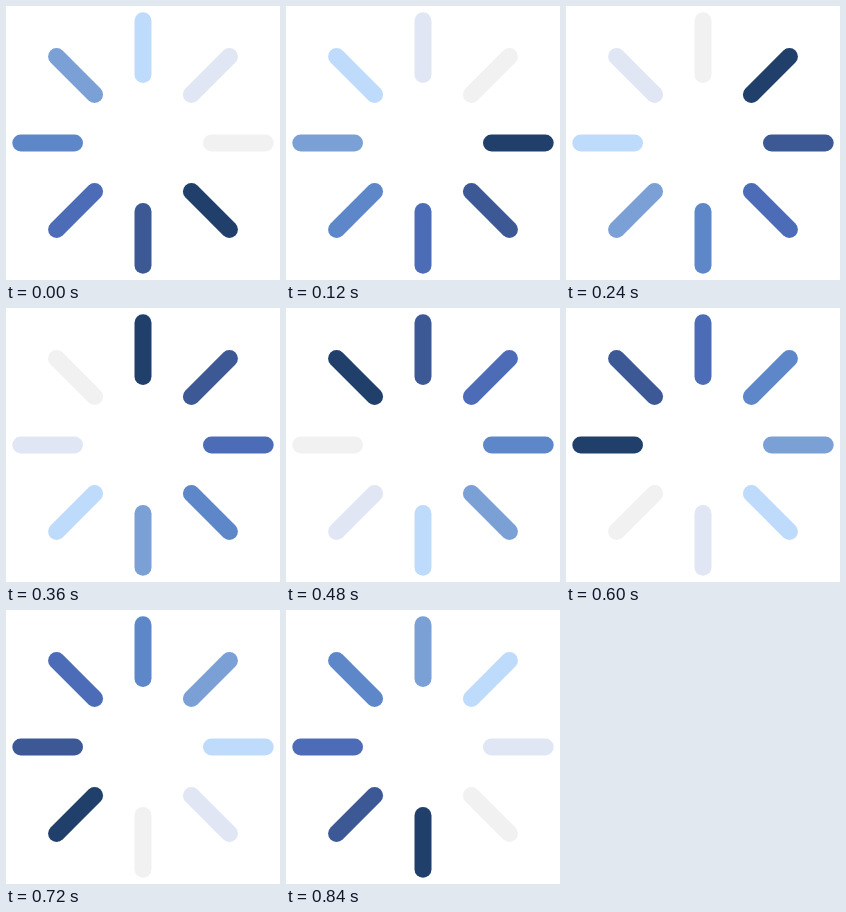
Animation, 274 px wide and 274 px high, one loop 960 ms. Source, as an HTML page:

```html
<!DOCTYPE html>
<html lang="en">
<head>
<meta charset="utf-8">
<title>Loading spinner</title>
<style>
  html, body { margin: 0; width: 100%; height: 100%; overflow: hidden; background: #fff; }
  svg { display: block; width: 100%; height: 100%; }
  line { stroke-width: 17; stroke-linecap: round; }
</style>
</head>
<body>
<svg id="spinner" viewBox="0 0 274 274"></svg>
<script>
  const STEP_MS = 120;
  const FIRST_DARK = 3; // bars count clockwise from the top
  const COLORS = ['#213f6b', '#3c5895', '#4c6cb7', '#5d87c9',
                  '#7aa0d5', '#bfdbfc', '#e1e6f4', '#f1f1f1'];
  const COUNT = COLORS.length;
  const spinner = document.getElementById('spinner');

  const bars = COLORS.map((_, i) => {
    const bar = document.createElementNS('http://www.w3.org/2000/svg', 'line');
    const attributes = {
      x1: 0, y1: -68.5, x2: 0, y2: -122.2,
      transform: `translate(137 137) rotate(${i * 360 / COUNT})`
    };
    for (const name in attributes) bar.setAttribute(name, attributes[name]);
    return spinner.appendChild(bar);
  });

  function draw(time) {
    const step = Math.floor(time / STEP_MS) % COUNT;
    bars.forEach((bar, i) => {
      bar.style.stroke = COLORS[(i - FIRST_DARK + step + COUNT) % COUNT];
    });
  }

  const start = performance.now();
  function tick() {
    draw(performance.now() - start);
    requestAnimationFrame(tick);
  }
  tick();
</script>
</body>
</html>
```
